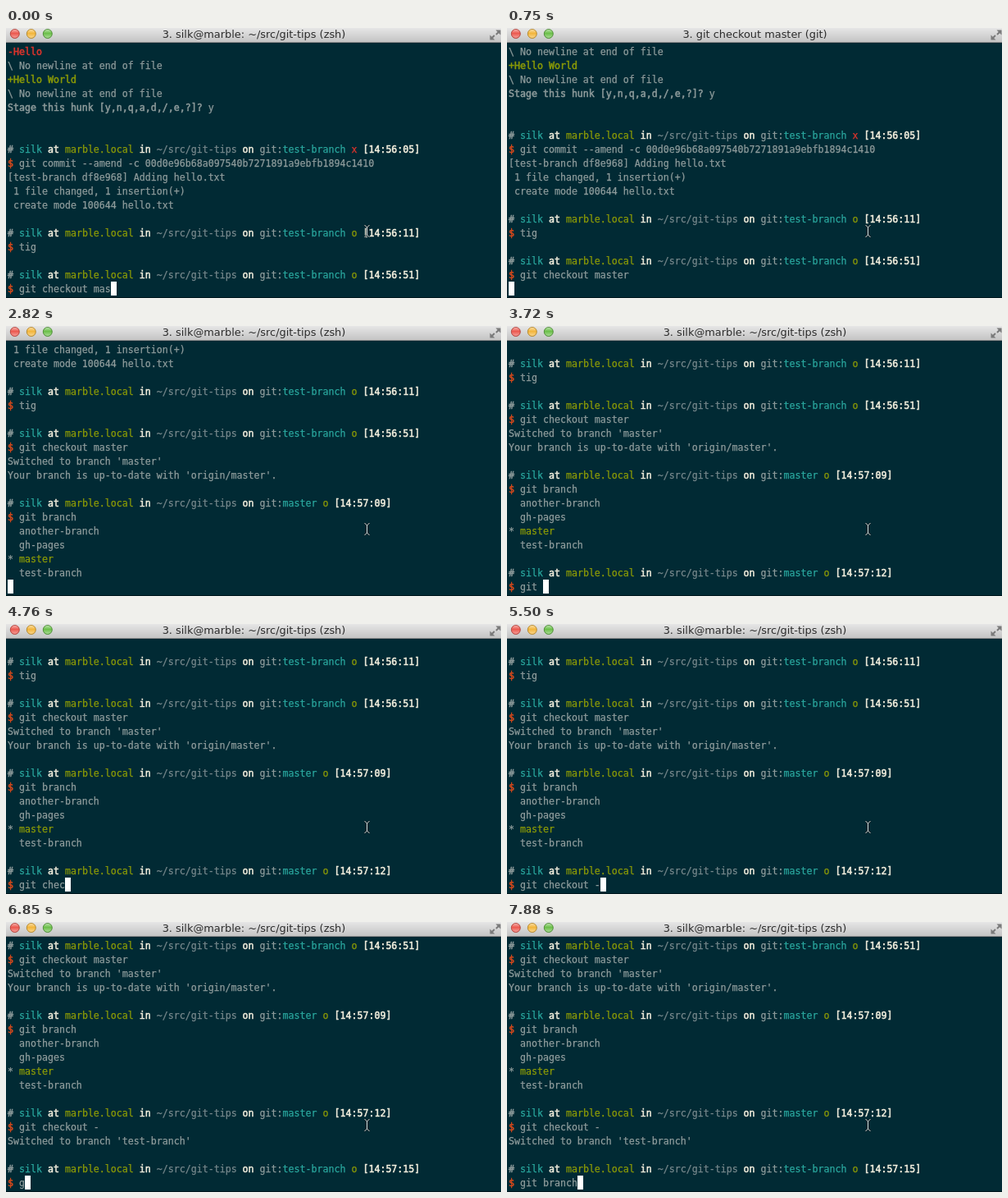
Recreate the animation shown at these times as an HTML page. Size 604 px wide and 329 px high, loop 8 s.

```html
<!DOCTYPE html>
<html lang="en">
<head>
<meta charset="utf-8">
<title>Terminal</title>
<style>
  html, body { margin: 0; width: 100%; height: 100%; overflow: hidden; background: #012a34; }
  svg { display: block; width: 100%; height: 100%; }
  #rows text { font: 11.627px "DejaVu Sans Mono", monospace; white-space: pre; }
  #rows tspan { color: #8f9c9c; fill: currentColor; stroke: currentColor; stroke-width: .25px; }
  #rows .w { color: #f5f0df; stroke-width: .5px; }
  #rows .c { color: #2aa79e; }
  #rows .g { color: #8c9b06; }
  #rows .r { color: #e0342c; }
  #rows .o { color: #dc4a1b; }
  #rows .d { color: #77888c; }
  #rows .b { stroke-width: .5px; }
  #title { font: 12.9px "DejaVu Sans", sans-serif; fill: #2b2b2b; text-anchor: middle; }
</style>
</head>
<body>
<svg viewBox="0 0 604 329">
  <defs>
    <linearGradient id="bar" x2="0" y2="1">
      <stop offset="0" stop-color="#e6e6e6"/>
      <stop offset="1" stop-color="#c2c2c2"/>
    </linearGradient>
    <linearGradient id="gloss" x2="0" y2="1">
      <stop offset="0" stop-color="#fff" stop-opacity=".5"/>
      <stop offset=".45" stop-color="#fff" stop-opacity="0"/>
      <stop offset="1" stop-color="#fff" stop-opacity=".4"/>
    </linearGradient>
    <path id="beam" d="M437.500 240L440.500 243L443.500 240M440.500 243V252M437.500 255L440.500 252L443.500 255"/>
  </defs>
  <rect width="604" height="329" fill="#012a34"/>
  <rect y="328" width="604" height="1" fill="#00171d"/>
  <rect id="cursor" y="309" width="7" height="17" fill="#fff"/>
  <g id="rows"></g>
  <rect width="604" height="18" fill="url(#bar)"/>
  <rect y="17" width="604" height="1" fill="#8a8a8a"/>
  <g id="lights" stroke-width=".8"></g>
  <text id="title" x="302.5" y="12"></text>
  <path d="M597.500 2.500H603.500V8.500ZM590.500 8.500V14.500H596.500Z" fill="#7a7a7a"/>
  <path d="M601 5L598 8M593 12L596 9" stroke="#7a7a7a" stroke-width="2"/>
  <g fill="none">
    <use href="#beam" stroke="#04161b" stroke-width="2"/>
    <use href="#beam" stroke="#dfe5e5"/>
  </g>
</svg>
<script>
const NS = "http://www.w3.org/2000/svg";
const LOOP = 8000, ROWS = 18, CELL = 7, ROW_H = 17, LEFT = 2, BASELINE = 33;
const USER = "silk", HOST = "marble";
const TITLE = `3. ${USER}@${HOST}: ~/src/git-tips (zsh)`;
const $ = id => document.getElementById(id);

function add(parent, tag, attrs, text = "") {
  const el = document.createElementNS(NS, tag);
  for (const k in attrs) el.setAttribute(k, attrs[k]);
  el.textContent = text;
  parent.append(el);
  return el;
}

// A line is a list of [text, style classes] runs.
const plain = s => [[s, ""]];
const blank = plain("");
const command = s => [["$", "o b"], [" " + s, ""]];
const prompt = (branch, mark, time) => [
  ["# ", "b"], [USER, "c"], [" at ", "w"], [HOST + ".local", "g"], [" in ", "w"],
  ["~/src/git-tips", "d"], [" on ", "w"], ["git:", ""], [branch, "c"],
  [" " + mark, mark === "x" ? "r" : "g"], [` [${time}]`, "w"]
];

const history = [
  [["-Hello", "r b"]],
  plain("\\ No newline at end of file"),
  [["+Hello World", "g b"]],
  plain("\\ No newline at end of file"),
  [["Stage this hunk [y,n,q,a,d,/,e,?]? ", "b"], ["y", ""]],
  blank, blank,
  prompt("test-branch", "x", "14:56:05"),
  command("git commit --amend -c 00d0e96b68a097540b7271891a9ebfb1894c1410"),
  plain("[test-branch df8e968] Adding hello.txt"),
  plain(" 1 file changed, 1 insertion(+)"),
  plain(" create mode 100644 hello.txt"),
  blank,
  prompt("test-branch", "o", "14:56:11"),
  command("tig"),
  blank,
  prompt("test-branch", "o", "14:56:51")
];

const afterMaster = [
  plain("Switched to branch 'master'"),
  plain("Your branch is up-to-date with 'origin/master'."),
  blank, prompt("master", "o", "14:57:09")
];
const branches = [
  plain("  another-branch"), plain("  gh-pages"),
  [["* ", ""], ["master", "g"]], plain("  test-branch")
];
const afterList = [blank, prompt("master", "o", "14:57:12")];
const afterDash = [
  plain("Switched to branch 'test-branch'"),
  blank, prompt("test-branch", "o", "14:57:15")
];

// Build the session as timed screens: finished lines plus the live last line.
const screens = [];
let lines = history;
const show = (at, live, title = TITLE) => screens.push({ at, lines, live, title });
const type = (text, keys) => keys.forEach(([at, n]) => show(at, command(text.slice(0, n))));
const print = (...more) => { lines = lines.concat(...more); };

type("git checkout master", [[0, 16], [150, 17], [300, 18], [450, 19]]);
print([command("git checkout master")]);
show(750, blank, "3. git checkout master (git)");
print(afterMaster);
show(900, command(""));
type("git branch", [[2090, 1], [2240, 3], [2390, 5], [2530, 8], [2680, 10]]);
print([command("git branch")], branches);
show(2820, blank);
print(afterList);
show(2970, command(""));
type("git checkout -", [
  [3420, 1], [3570, 3], [3720, 4], [4460, 5], [4610, 6], [4760, 8],
  [4900, 9], [5050, 11], [5200, 12], [5350, 13], [5500, 14]
]);
print([command("git checkout -")], afterDash);
show(5950, command(""));
type("git branch", [[6850, 1], [7000, 3], [7140, 4], [7590, 6], [7740, 8], [7880, 10]]);

[["#ec5a50", "#a8362f"], ["#f3b63c", "#a97b1e"], ["#6cc04a", "#417f2a"]].forEach(([fill, stroke], i) => {
  const dot = { cx: 10.8 + 20 * i, cy: 7, r: 5.5 };
  add($("lights"), "circle", { ...dot, fill, stroke });
  add($("lights"), "circle", { ...dot, r: 5, fill: "url(#gloss)" });
});

const rows = Array.from({ length: ROWS }, (_, i) =>
  add($("rows"), "text", { x: LEFT, y: BASELINE + i * ROW_H }));

function draw({ lines, live, title }) {
  const view = [...lines, live].slice(-ROWS);
  rows.forEach((row, i) => {
    row.textContent = "";
    for (const [text, cls] of view[i]) add(row, "tspan", { class: cls }, text);
  });
  const column = live.reduce((n, [text]) => n + text.length, 0);
  $("cursor").setAttribute("x", LEFT + column * CELL);
  $("title").textContent = title;
}

let current;
function update(ms) {
  const t = ms % LOOP;
  const screen = screens.findLast(s => s.at <= t);
  if (screen !== current) draw(current = screen);
}

const start = performance.now();
function tick() {
  update(performance.now() - start);
  requestAnimationFrame(tick);
}
tick();
</script>
</body>
</html>
```
